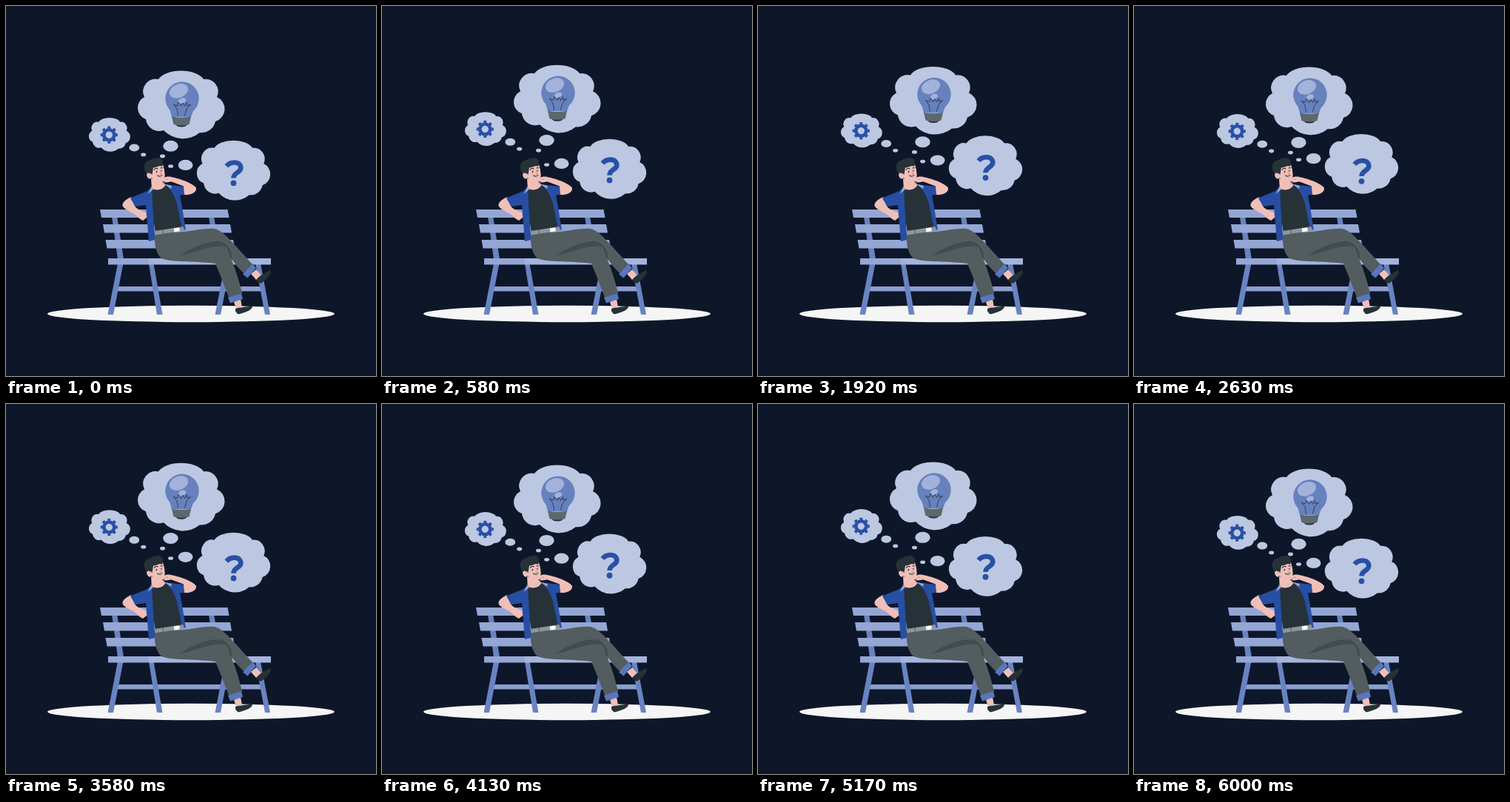
These frames come from a looping animation (500x500 px, 6.04 s). An HTML page:

```html
<!DOCTYPE html>
<html lang="en">
<head>
<meta charset="utf-8">
<title>Thinking on a bench</title>
<style>
  html, body { margin: 0; width: 100%; height: 100%; overflow: hidden; background: #0e1729; }
  svg { display: block; width: 100%; height: 100%; }
  .slat { fill: #94a6d4; }
  .leg { fill: #6983c2; }
  .skin { fill: #f0bfb8; }
  .dark { fill: #263238; }
  .shirt { fill: #274ea3; }
  .pants { fill: #535d60; }
  .cuff { fill: #5877bd; }
  .cloud { fill: #bcc8e1; }
  .line { fill: none; stroke: #263238; stroke-linecap: round; stroke-linejoin: round; }
</style>
</head>
<body>
<svg viewBox="0 0 500 500">
  <defs>
    <!-- Puffy cloud centred on the origin -->
    <path id="puff" transform="translate(-237 -133.5)" d="M206 99A32 16.5 0 0 1 267 99A17 17 0 0 1 285 123A17.6 17.6 0 0 1 283 156A19 19 0 0 1 262 171A36 36 0 0 1 213 168A18 18 0 0 1 189 153A16.3 16.3 0 0 1 187 123A17 17 0 0 1 206 99Z"/>
  </defs>

  <ellipse cx="250" cy="416" rx="194" ry="11.200" fill="#f5f5f5"/>

  <g id="bench">
    <path class="leg" d="M143 284h7l9 58h-8zM274 284h7l9 58h-8z"/>
    <path class="slat" d="M127 275H299.500L301.500 286H129zM131 295H303L305 306.500H133zM134.500 316H307L309 327.500H136.500z"/>
    <path fill="#8b9ed0" d="M148 379H344V385.500H148z"/>
    <path class="leg" d="M151 348h7.500L145 417h-7.500zM192 342h6.500L211.500 417h-7.500zM296 348h7.500L290 417h-7.500zM337 348h7L357 417h-7z"/>
    <path class="slat" d="M138 341H193L194.500 349.500H138z"/>
    <path fill="#a5b4dc" d="M192 341H358V349.500H193.500z"/>
  </g>

  <g id="man">
    <path class="skin" d="M169 258C161 262 156 266 158 271C161 276 174 279 180 287L185 290L190 286L189 279C181 276 176 274 174 270Z"/>
    <path class="skin" d="M196 233L211 237L216 242L209 250L197 248Z"/>
    <path class="dark" d="M197 247C205 250 212 248 216 242L226 248L234 266L240 301L202 306L196 270Z"/>
    <path class="shirt" d="M197 244L191 250L168 259.500L174.500 271L189 269L193 318L201.500 316L200.500 303L198.500 275Z"/>
    <path class="shirt" d="M214 241L241 244L241.500 255L235 255.500L238 272L243 303L238 301L230.500 265Q225 248 214 241Z"/>
    <path class="slat" d="M197 243L191.500 254L198.500 248.500ZM214 240.500L224 243L223 247Z"/>
    <path class="skin" d="M241 255C251 256 258 251 257 246C254 240 234 233 225 231.500C219 229 212 231 211.500 236C214 240 219 237.500 224 237.500L240 243.500Z"/>

    <path class="skin" d="M196 222C198 216 205 213 212 214C214 220 215.500 229 214 234C212 239 205 239 200 235L195 231Z"/>
    <path class="dark" d="M191 229C188 224 185 217 188 213C189 208 196 209 199 206C203 206 207 204 210 207C213 209 213 214 210.500 217C207 214 204 219 199 218.500L197.500 228L195 225Z"/>
    <ellipse class="skin" cx="193.500" cy="229.500" rx="3" ry="4.200" transform="rotate(-25 193.500 229.500)"/>
    <path class="line" stroke-width="1.200" d="M200.500 221Q203 218.500 205 220M209 219L211.500 218.500"/>
    <path fill="none" stroke="#c98882" stroke-width=".7" d="M208 222L210 226L208 226.500M213 237Q216 234 219 234"/>
    <ellipse class="dark" cx="203.500" cy="224" rx=".8" ry="1.200"/>
    <ellipse class="dark" cx="210" cy="222.500" rx=".7" ry="1.100"/>
    <path fill="#fff" stroke="#263238" stroke-width=".7" d="M204 229Q208 230.500 211 228Q209.500 233 204 229Z"/>

    <path class="pants" d="M201 308L241 305C252 304 270 300 281 301C295 302 318 335 336 351.500L323 362.500C313 354 307 345 302 337C309 352 315 371 319 388L301 394C296 380 289 362 283 348C250 344 224 347 210 341C203 335 200 322 201 308Z"/>
    <path fill="#434b4e" d="M234 338C247 329 263 320 283 318C294 317 300 323 304 331L306 346L298 325.500C282 321 260 332 234 338Z"/>
    <path fill="#8c9799" d="M201 304L239.500 298L241 303.500L201 309.500Z"/>
    <path class="line" stroke-width=".6" d="M212 302.500L212.500 307.500"/>
    <rect x="227" y="300" width="7.500" height="5" rx="1" fill="#fff" transform="rotate(-7 230 302)"/>

    <path class="skin" d="M331 362L338 356L345 364L338 370ZM308 400L317 396L319 407L311 409Z"/>
    <path class="cuff" d="M320 362.500L333 348.500L338 354L326.500 367.500ZM300 394L318 388L320 396L303 401.500Z"/>
    <path class="dark" d="M338 371C342 363 352 361 357 356.500C359 362 354 369 344 375ZM310 409C316 407 325 407 333 405C334 410 325 414 314 416.500Q309 414 310 409Z"/>
  </g>

  <g id="ideas">
    <use href="#puff" class="cloud" transform="translate(237 133.500)"/>
    <use href="#puff" class="cloud" transform="translate(140 174) scale(.475 .5)"/>
    <g class="cloud">
      <ellipse cx="222.500" cy="189.300" rx="10.200" ry="7.500"/>
      <ellipse cx="211.500" cy="203" rx="3.500" ry="2.400"/>
      <ellipse cx="173.300" cy="191.600" rx="6.900" ry="5"/>
      <ellipse cx="185.700" cy="200.900" rx="3.500" ry="2.400"/>
    </g>
    <circle cx="238" cy="125" r="22.700" fill="#6781be"/>
    <path fill="#6781be" d="M221 139L224 150H250L254 139Z"/>
    <ellipse cx="233.500" cy="114.800" rx="13" ry="9.200" fill="#a3b2da" transform="rotate(-22 233.500 114.800)"/>
    <ellipse cx="238" cy="128" rx="5.200" ry="3.600" fill="#a3b2da" transform="rotate(-22 238 128)"/>
    <path class="line" stroke-width=".8" d="M232.500 148L231 139L226.500 133L231.500 135L233 130L236.500 135.500L239 131L241.500 135.500L244.500 130.500L245 135L249.500 133L244 139L241.500 148"/>
    <path class="dark" d="M229 160H245Q243 163.500 237 163.500T229 160Z"/>
    <path fill="#5c686c" d="M224 149.500Q237 152 250 149.500L247.500 160Q237 163 226.500 160Z"/>
    <g fill="none" stroke="#2850a6">
      <circle cx="139.300" cy="174.200" r="7" stroke-width="4.600"/>
      <circle cx="139.300" cy="174.200" r="10" stroke-width="3.200" pathLength="16" stroke-dasharray="1" stroke-dashoffset=".5"/>
    </g>
  </g>

  <g id="doubt" class="cloud">
    <use href="#puff" transform="translate(307.700 222.300) scale(.845 .882)"/>
    <ellipse cx="242.600" cy="214.900" rx="9.900" ry="7.100"/>
    <ellipse cx="222.600" cy="216.500" rx="3.500" ry="2.300"/>
  </g>
  <g id="mark">
    <path fill="none" stroke="#2850a6" stroke-width="6.600" d="M298 216.500Q302 211.500 308.500 211.500C314 211.500 317.300 214.500 317.300 219C317.300 225 307.500 225 307.500 232.500"/>
    <circle cx="307.500" cy="239.300" r="3.900" fill="#2850a6"/>
  </g>
</svg>
<script>
  const LOOP = 6040, LIFT = 10;
  const periods = { ideas: 1500, mark: 3000, doubt: 6000 };

  // Linear rise and fall: 0 -> 1 -> 0 over one period
  const bob = (t, period) => 1 - Math.abs(1 - 2 * (t % period) / period);

  function draw() {
    const t = Math.min(performance.now() % LOOP, 6000);
    for (const [id, period] of Object.entries(periods)) {
      const y = -LIFT * bob(t, period);
      document.getElementById(id).setAttribute("transform", `translate(0 ${y})`);
    }
    requestAnimationFrame(draw);
  }
  draw();
</script>
</body>
</html>
```
